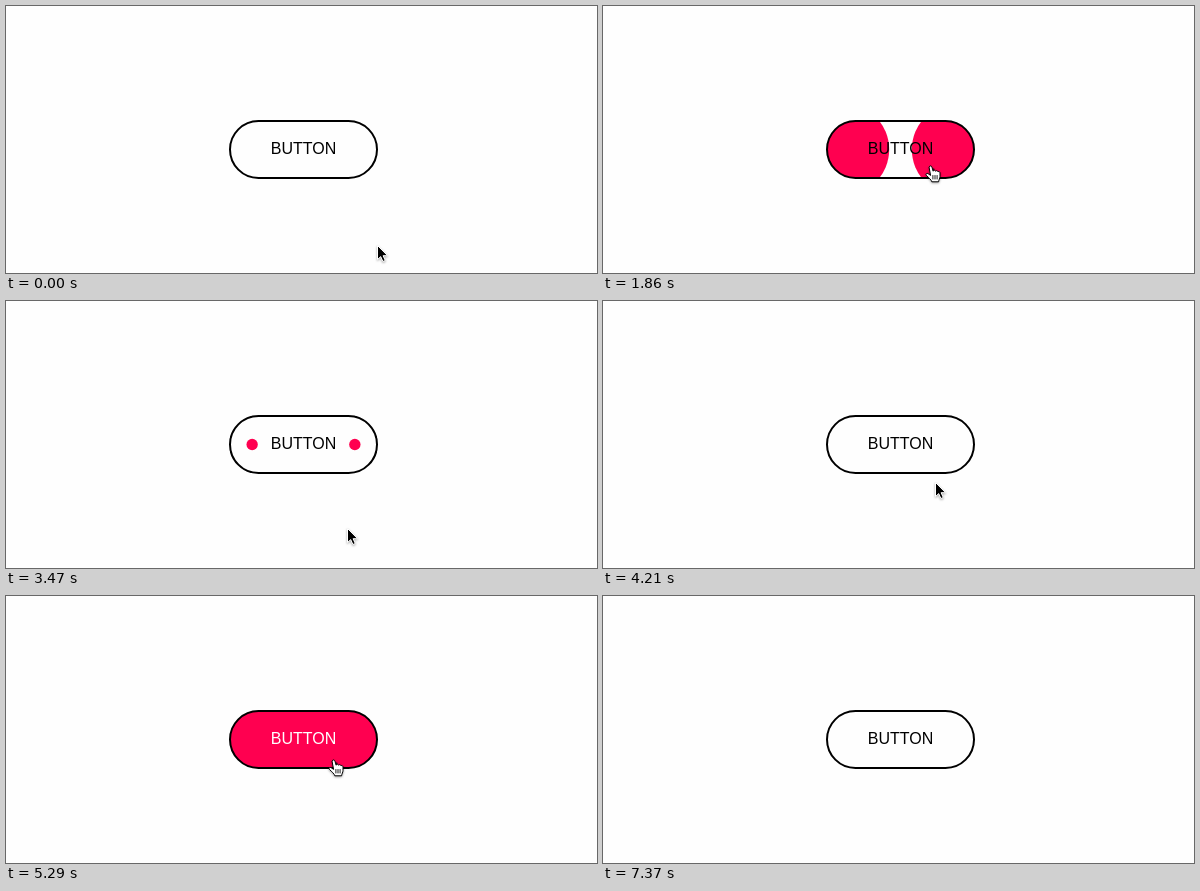
These frames come from a looping animation (591 px wide and 267 px high, 7.7 s). An HTML page:

```html
<!DOCTYPE html>
<html lang="en">
<head>
<meta charset="utf-8">
<title>Button hover</title>
<style>
  html, body { margin: 0; width: 100%; height: 100%; overflow: hidden; background: #fefefe; }
  svg { display: block; }
  text { font: 16px "Liberation Sans", Arial, sans-serif; }
  .cursor { filter: drop-shadow(0 1px 1px rgba(0, 0, 0, .35)); }
</style>
</head>
<body>
<svg width="591" height="267" viewBox="0 0 591 267">
  <clipPath id="pill"><rect x="224" y="115" width="147" height="57" rx="28.5"/></clipPath>
  <g clip-path="url(#pill)" fill="#ff0050">
    <circle id="left" cy="143.5"/>
    <circle id="right" cy="143.5"/>
  </g>
  <rect x="224" y="115" width="147" height="57" rx="28.5" fill="none" stroke="#000" stroke-width="2"/>
  <text id="label" x="297.5" y="148" text-anchor="middle">BUTTON</text>
  <g id="cursor" class="cursor">
    <path id="arrow" d="M.5 .5V14.6L3.7 11.6L5.9 16.5L8.3 15.5L6.1 10.7H10.6Z" stroke="#fff"/>
    <g id="hand" stroke="#000" stroke-linejoin="round" stroke-linecap="round">
      <path fill="#fff" d="M.2 .7C1-.6 2.5-.2 2.9 1.1L4.2 5.2C5-.0 4.4 4.3 6.4 5.1C7.4 4.3 8.6 4.7 9 5.7C10.2 5.2 11 5.9 11 7V10.5C11 12.5 9.8 13.5 9.6 15.8H2.8C2.4 13.8-.2 11.8-2.7 9.3C-3.6 8 -2.2 6.8 -1 7.6L1.3 9.2Z"/>
      <path fill="none" stroke-width=".9" d="M3.9 9.5V13M6 9.5V13M8.1 9.5V13"/>
    </g>
  </g>
</svg>
<script>
const LOOP = 7700, FADE = 200, FULL = 95;
const $ = id => document.getElementById(id);
const clamp = v => Math.min(1, Math.max(0, v));

// Hover periods: the fill starts growing, then starts shrinking.
const hovers = [[1575, 2772], [4775, 5846]];

// Cursor stops: time, x, y
const stops = [
  [0, 371, 239], [800, 371, 239], [1560, 326, 160], [2730, 326, 160],
  [3000, 338, 210], [3300, 341, 227], [3700, 341, 227], [4210, 332, 181],
  [4320, 326, 164], [5780, 326, 164], [6200, 335, 211], [6520, 335, 211],
  [7130, 526, 270], [LOOP, 526, 270]
];

// The CSS "ease" curve, cubic-bezier(.25, .1, .25, 1)
function ease(p) {
  p = clamp(p);
  const bezier = (a, b, s) => 3 * a * s * (1 - s) ** 2 + 3 * b * s * s * (1 - s) + s ** 3;
  let lo = 0, hi = 1;
  for (let i = 0; i < 20; i++) {
    const mid = (lo + hi) / 2;
    if (bezier(.25, .25, mid) < p) lo = mid; else hi = mid;
  }
  return bezier(.1, 1, lo);
}

function cursorAt(t) {
  const i = Math.max(1, stops.findIndex(s => s[0] > t));
  const [t0, x0, y0] = stops[i - 1], [t1, x1, y1] = stops[i];
  const p = (t - t0) / (t1 - t0), k = p * p * (3 - 2 * p);
  return [x0 + (x1 - x0) * k, y0 + (y1 - y0) * k];
}

function draw(t) {
  let grow = 0, white = 0;
  for (const [enter, leave] of hovers) {
    grow += ease((t - enter) / 1000) - ease((t - leave) / 1000);
    white += clamp((t - enter - 300) / FADE) - clamp((t - leave) / FADE);
  }
  const r = FULL * clamp(grow), cx = 247 - .15 * r;
  $('left').setAttribute('cx', cx);
  $('right').setAttribute('cx', 595 - cx);
  for (const id of ['left', 'right']) $(id).setAttribute('r', r);

  const shade = Math.round(255 * clamp(white));
  $('label').setAttribute('fill', `rgb(${shade},${shade},${shade})`);

  const [x, y] = cursorAt(t), over = y < 172;
  $('cursor').setAttribute('transform', `translate(${Math.round(x)} ${Math.round(y)})`);
  $('arrow').setAttribute('visibility', over ? 'hidden' : 'visible');
  $('hand').setAttribute('visibility', over ? 'visible' : 'hidden');
}

const start = performance.now();
function tick() {
  draw((performance.now() - start) % LOOP);
  requestAnimationFrame(tick);
}
tick();
</script>
</body>
</html>
```
